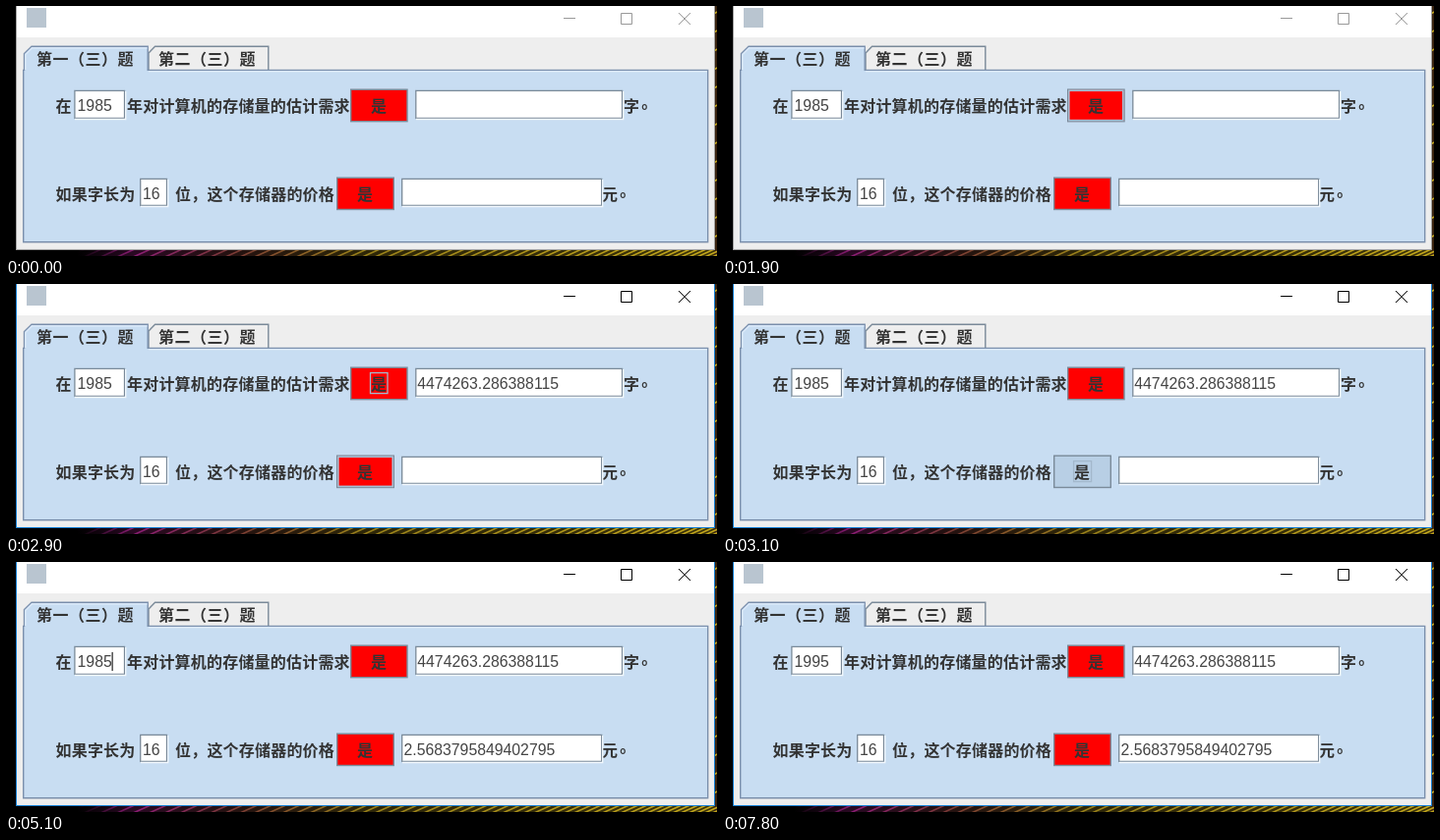
Animation of 723x255 px, one loop 8000 ms. Source, as an HTML page:

```html
<!DOCTYPE html>
<html lang="zh-Hans">
<head>
<meta charset="utf-8">
<title>存储器估算</title>
<style>
html, body { margin: 0; width: 100%; height: 100%; overflow: hidden; background: #000; }
svg { display: block; width: 723px; height: 255px; }
text { white-space: pre; }
.label { font: 700 16px "Noto Sans CJK SC", "Noto Sans CJK", sans-serif; letter-spacing: .2px; fill: #333; }
.tab { letter-spacing: .5px; }
.mid { font-family: "Noto Sans CJK TC", "Noto Sans CJK", sans-serif; }
.number { font: 15.8px "Liberation Sans", Arial, sans-serif; fill: #444; }
.field { fill: #fff; stroke: #7a8a99; stroke-width: 1.3; }
.shine { fill: none; stroke: #f2f8fd; stroke-width: 1.3; }
.button { fill: #f00; stroke: #7a8a99; stroke-width: 1.4; }
.hover { fill: none; stroke: #a9bfd4; stroke-width: 1.6; }
.focus { fill: none; stroke: #a3b8cc; stroke-width: 1.3; }
.selection { fill: #b8cfe5; }
.caret { fill: #333; }
.controls { fill: none; stroke: #999; }
.frame { fill: #eee; stroke: #a5a5a5; }

/* Every state switches hard on one shared 8 s clock. */
[style*="--t"], .frame, .controls, .price { animation: var(--t) 8s step-end infinite; }
.frame { --t: frame; }
.controls { --t: controls; }
.price { --t: press; }
@keyframes frame { 0% { stroke: #a5a5a5 } 27.5%, to { stroke: #1883d7 } }
@keyframes controls { 0% { stroke: #999 } 27.5%, to { stroke: #000 } }
@keyframes press { 0% { fill: #f00 } 38.75% { fill: #b8cfe5 } 40%, to { fill: #f00 } }
@keyframes hover1 { 0% { opacity: 0 } 13.75% { opacity: 1 } 15% { opacity: 0 } 23.75% { opacity: 1 } 30%, to { opacity: 0 } }
@keyframes hover2 { 0% { opacity: 0 } 36.25% { opacity: 1 } 38.75% { opacity: 0 } 40% { opacity: 1 } 45%, to { opacity: 0 } }
@keyframes focus1 { 0% { opacity: 0 } 27.5% { opacity: 1 } 38.75%, to { opacity: 0 } }
@keyframes focus2 { 0% { opacity: 0 } 38.75% { opacity: 1 } 63.75%, to { opacity: 0 } }
@keyframes answer1 { 0% { opacity: 0 } 27.5%, to { opacity: 1 } }
@keyframes answer2 { 0% { opacity: 0 } 40%, to { opacity: 1 } }
@keyframes select5 { 0% { opacity: 0 } 67.5% { opacity: 1 } 88.75%, to { opacity: 0 } }
@keyframes select8 { 0% { opacity: 0 } 77.5% { opacity: 1 } 88.75%, to { opacity: 0 } }
@keyframes erase { 0% { opacity: 1 } 88.75%, to { opacity: 0 } }
@keyframes type9 { 0% { opacity: 0 } 90%, to { opacity: 1 } }
@keyframes type5 { 0% { opacity: 0 } 91.25%, to { opacity: 1 } }
@keyframes caret {
  0% { opacity: 0; transform: translateX(18px) }
  63.75% { opacity: 1; transform: translateX(18px) }
  67.5% { opacity: 1; transform: translateX(9px) }
  72.5% { opacity: 0; transform: translateX(9px) }
  77.5% { opacity: 1; transform: none }
  83.75% { opacity: 0; transform: none }
  88.75% { opacity: 1; transform: none }
  90% { opacity: 1; transform: translateX(9px) }
  91.25% { opacity: 1; transform: translateX(18px) }
  97.5%, to { opacity: 0; transform: translateX(18px) }
}
</style>
</head>
<body>
<svg viewBox="0 0 723 255">
  <defs>
    <linearGradient id="glow" gradientUnits="userSpaceOnUse" x1="0" y1="0" x2="723" y2="0">
      <stop offset=".1" stop-color="#000"/>
      <stop offset=".18" stop-color="#8c1d75"/>
      <stop offset=".32" stop-color="#7a3a35"/>
      <stop offset=".5" stop-color="#98801a"/>
      <stop offset="1" stop-color="#c4a81c"/>
    </linearGradient>
  </defs>
  <rect width="723" height="255"/>
  <rect x="60" y="248" width="663" height="7" fill="url(#glow)" opacity=".3"/>
  <rect x="720" width="3" height="255" fill="#3a2410"/>
  <path id="streaks" fill="none" stroke="url(#glow)" stroke-width="1.6"/>

  <!-- Window -->
  <rect class="frame" x="10.5" y="-5.5" width="710" height="254"/>
  <rect x="11" width="709" height="32" fill="#fff"/>
  <rect x="21" y="2" width="20" height="20" fill="#b9c5d0"/>
  <path class="controls" d="M567 12.5h12M625.5 7.5h11v11h-11z"/>
  <path class="controls" d="M684 7l12 12M696 7l-12 12"/>

  <!-- Tabs -->
  <g stroke-width="1.4">
    <path d="M145 65V48l6.500-6.700H266.800V65" fill="#eee" stroke="#7a8a99"/>
    <path d="M17.700 240.700V65.400H18.500V48.500L26 41.300H144.200V65.400H713.700V240.700z" fill="#c8ddf2" stroke="#7a8fac"/>
    <path d="M19.800 65V49.500L26.500 42.700H143.500M145 66.700H713" fill="none" stroke="#dceafa"/>
  </g>
  <text class="label tab" x="31" y="59.500">第一（三）题</text>
  <text class="label tab" x="155" y="59.500">第二（三）题</text>

  <!-- Storage demand -->
  <text class="label" x="50.500" y="108">在</text>
  <text class="label" x="123" y="108">年对计算机的存储量的估计需求</text>
  <text class="label" x="628" y="108">字<tspan class="mid" lang="zh-Hant" dx="-3" dy="1">。</tspan></text>
  <rect class="field" x="69.900" y="86.400" width="50.600" height="28"/>
  <path class="shine" d="M121.700 87v28.500H70"/>
  <rect class="selection" x="99" y="92" width="9" height="19" style="--t:select5"/>
  <rect class="selection" x="90" y="92" width="9" height="19" style="--t:select8"/>
  <g class="number">
    <text x="72.500" y="107">19</text>
    <text x="90.200" y="107" style="--t:erase">85</text>
    <text x="90.200" y="107" style="--t:type9">9</text>
    <text x="99" y="107" style="--t:type5">5</text>
  </g>
  <rect class="caret" x="89.500" y="92" width="1.300" height="19" style="--t:caret"/>
  <rect class="field" x="416.800" y="86.400" width="209.800" height="28"/>
  <path class="shine" d="M627.700 87v28.500H417"/>
  <text class="number" x="418.300" y="107" style="--t:answer1">4474263.286388115</text>
  <rect class="button" x="350.700" y="85.200" width="57.300" height="32.500"/>
  <rect class="hover" x="351.800" y="86.300" width="55" height="30.300" style="--t:hover1"/>
  <text class="label" x="371" y="108">是</text>
  <rect class="focus" x="370.500" y="90.600" width="17.500" height="21" style="--t:focus1"/>

  <!-- Price -->
  <text class="label" x="50.500" y="198">如果字长为</text>
  <text class="label" x="172" y="198">位，这个存储器的价格</text>
  <text class="label" x="606" y="198">元<tspan class="mid" lang="zh-Hant" dx="-3" dy="1">。</tspan></text>
  <rect class="field" x="136.700" y="176.400" width="26.800" height="27"/>
  <path class="shine" d="M164.700 177v27.500H137"/>
  <text class="number" x="139" y="197">16</text>
  <rect class="field" x="402.700" y="176.400" width="203" height="27"/>
  <path class="shine" d="M606.700 177v27.500H403"/>
  <text class="number" x="404.500" y="197" style="--t:answer2">2.5683795849402795</text>
  <rect class="button price" x="336.700" y="175.200" width="57.600" height="32.300"/>
  <rect class="hover" x="337.800" y="176.300" width="55.400" height="30.100" style="--t:hover2"/>
  <text class="label" x="357" y="198">是</text>
  <rect class="focus" x="356.600" y="180.600" width="18" height="21" style="--t:focus2"/>
</svg>
<script>
// Shallow desktop streaks, packed closer towards the right.
let path = "";
for (let x = 60; x < 723; x += 18 - x / 70) path += `M${x.toFixed(1)} 257l20-9`;
for (let y = 6; y < 250; y += 19) path += `M718 ${y + 3}l7-4`;
document.getElementById("streaks").setAttribute("d", path);
</script>
</body>
</html>
```
